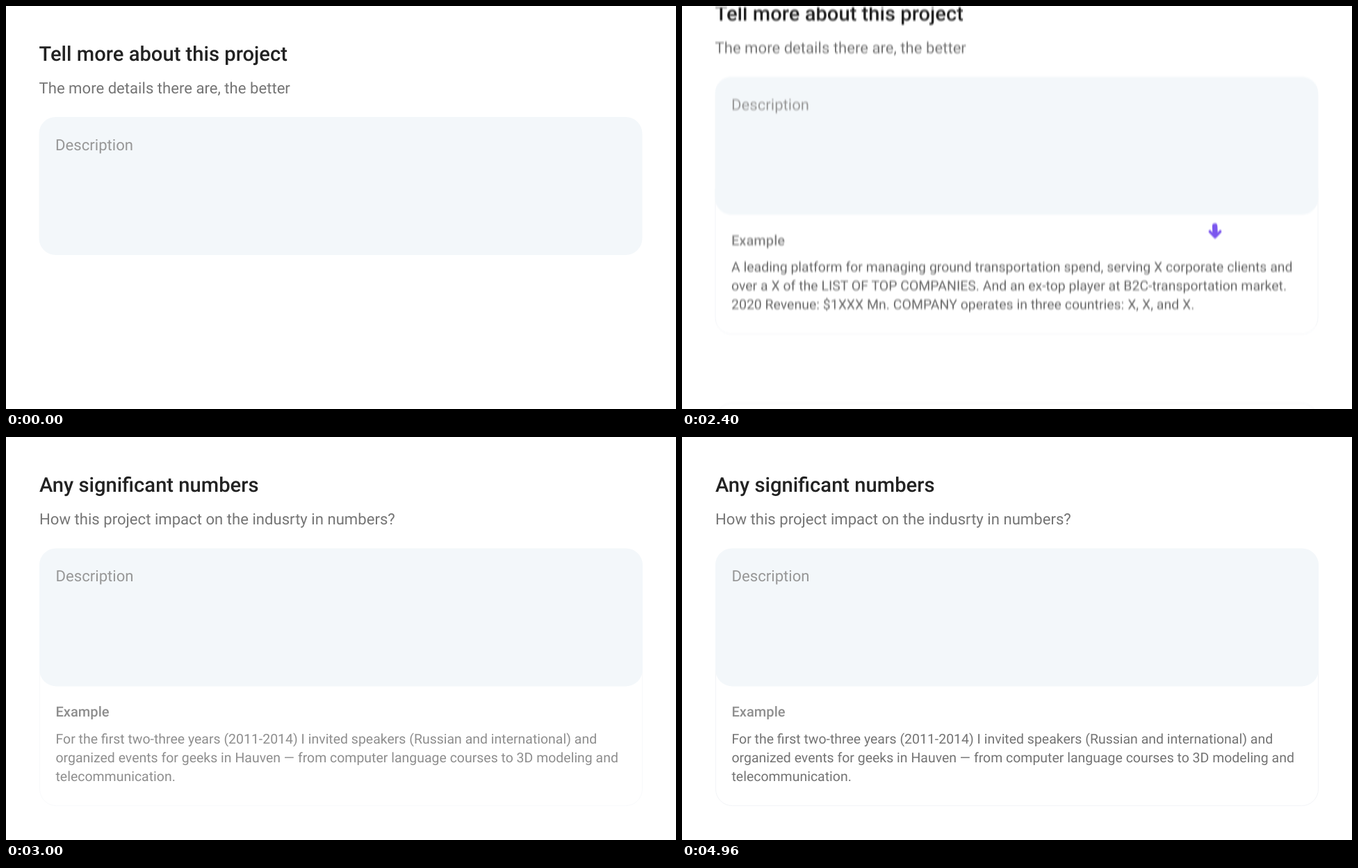
Recreate the animation shown at these times as an HTML page. Size 964 by 581 pixels, loop 5800 ms.

```html
<!DOCTYPE html>
<html lang="en">
<head>
<meta charset="utf-8">
<title>Project form</title>
<style>
  html, body { margin: 0; width: 100%; height: 100%; overflow: hidden; background: #fff; }
  svg { display: block; width: 964px; height: 581px; }
  text { font-family: Roboto, Arial, sans-serif; text-rendering: geometricPrecision; }
  .title { font-size: 29.17px; font-weight: 500; fill: #222; }
  .sub { font-size: 22.14px; fill: #757575; }
  .hint { font-size: 22.14px; fill: #979797; }
  .label { font-size: 20.1px; font-weight: 500; }
  .body { font-size: 19.48px; }
  .box { fill: #f3f7fa; }
  .card { fill: none; stroke: #f2f4f7; }
  .arrow { fill: none; stroke: #7b57ee; stroke-width: 7.5; stroke-linecap: round; stroke-linejoin: round; }
</style>
</head>
<body>
<svg id="stage" viewBox="0 0 964 581" xmlns="http://www.w3.org/2000/svg">
  <defs>
    <filter id="blur" filterUnits="userSpaceOnUse" x="0" y="-300" width="964" height="1181"
      color-interpolation-filters="sRGB"></filter>
  </defs>
  <g id="world"><g id="home"><g id="scenes"></g></g></g>
</svg>
<script>
const LOOP = 5800, STEP = 40, H = 581;
const SLIDE = { start: 2230, time: 651, path: 3 * H, shutter: 5.2 };
const CUT = SLIDE.start + SLIDE.time / 2;

// dark and grey hold the levels of [label, body]
const scenes = [
  {
    title: 'Tell more about this project',
    sub: 'The more details there are, the better',
    lines: [
      'A leading platform for managing ground transportation spend, serving X corporate clients and',
      'over a X of the LIST OF TOP COMPANIES. And an ex-top player at B2C-transportation market.',
      '2020 Revenue: $1XXX Mn. COMPANY operates in three countries: X, X, and X.'
    ],
    shift: [0, 0], arrowX: 0, arrowAt: 650,
    show: [190, 600], dim: [660, 1480], dark: [51, 58], grey: [133, 102]
  },
  {
    title: 'Any significant numbers',
    sub: 'How this project impact on the indusrty in numbers?',
    lines: [
      'For the first two-three years (2011-2014) I invited speakers (Russian and international) and',
      'organized events for geeks in Hauven — from computer language courses to 3D modeling and',
      'telecommunication.'
    ],
    shift: [0.5, 0.4], arrowX: 89.5, arrowAt: 3050,
    show: [2880, 3280], dim: [4330, 4920], dark: [34, 34], grey: [143, 115]
  }
];

const $ = id => document.getElementById(id);
const clamp = x => Math.max(0, Math.min(1, x));
const span = (t, a, b) => clamp((t - a) / (b - a));
const mix = (a, b, k) => a + (b - a) * k;
const inOut = u => u < 0.5 ? 4 * u ** 3 : 1 - 4 * (1 - u) ** 3;
const out = u => 1 - (1 - u) ** 2;

function add(parent, tag, attrs = {}, text = '') {
  const el = document.createElementNS('http://www.w3.org/2000/svg', tag);
  for (const k in attrs) el.setAttribute(k, attrs[k]);
  el.textContent = text;
  return parent.appendChild(el);
}
const set = (el, attrs) => { for (const k in attrs) el.setAttribute(k, attrs[k]); };
const show = (el, on) => { el.style.display = on ? '' : 'none'; };

function build(s) {
  const g = s.el = add($('scenes'), 'g');
  const page = add(g, 'g', { transform: `translate(${s.shift})` });
  const write = (parent, cls, x, y, text) => add(parent, 'text', { class: cls, x, y }, text);

  s.example = add(page, 'g');
  add(s.example, 'rect', { class: 'card', x: 48, y: 300, width: 867, height: 231.2, rx: 24 });
  s.label = write(s.example, 'label', 71, 403, 'Example');
  s.body = add(s.example, 'g');
  s.lines.forEach((line, i) => write(s.body, 'body', 71, 441.4 + 26.9 * i, line));

  add(page, 'rect', { class: 'box', x: 47.5, y: 160, width: 868, height: 199, rx: 24 });
  write(page, 'title', 47.5, 78.8, s.title);
  write(page, 'sub', 47.5, 126, s.sub);
  write(page, 'hint', 71, 208, 'Description');

  s.arrow = add(g, 'g', { class: 'arrow', transform: `translate(${s.arrowX})` });
  s.shaft = add(s.arrow, 'path', { d: 'M499 117C634 117 767 251 767 388' });
  s.head = add(s.arrow, 'path', { d: 'M-14.7-20L0-4.4L14.7-20' });
  s.length = s.shaft.getTotalLength();
}
scenes.forEach(build);

// Box blur: each pass averages the picture with a copy moved by half the last distance
const passes = Array.from({ length: 7 }, (_, i) => {
  const src = i ? 'mix' + (i - 1) : 'SourceGraphic';
  const move = add($('blur'), 'feOffset', { in: src, dx: 0, dy: 0, result: 'move' + i });
  add($('blur'), 'feComposite', {
    in: src, in2: 'move' + i, operator: 'arithmetic', k1: 0, k2: 0.5, k3: 0.5, k4: 0, result: 'mix' + i
  });
  return move;
});

// Mirrored copies above and below the page
const tiles = [-3, -2, -1, 1].map(k => ({ k, el: add($('world'), 'use', { href: '#scenes' }) }));

function slideAt(t) {
  const x = span(t, SLIDE.start, SLIDE.start + SLIDE.time);
  const s = 0.5 + 0.5 * Math.cbrt(2 * x - 1);
  return SLIDE.path * s * s * (3 - 2 * s);
}

function drawSlide(t) {
  const moving = t > SLIDE.start && t < SLIDE.start + SLIDE.time;
  tiles.forEach(tile => show(tile.el, moving));
  if (!moving) {
    $('world').removeAttribute('filter');
    $('home').removeAttribute('transform');
    return;
  }
  const from = slideAt(t - SLIDE.shutter / 2), to = slideAt(t + SLIDE.shutter / 2);
  const smear = Math.min(400, to - from);
  const y = (t < CUT ? 0 : SLIDE.path) - (from + to) / 2 - smear / 2;
  const base = ((y % (2 * H)) + 2 * H) % (2 * H);
  set($('home'), { transform: `translate(0 ${base})` });
  for (const { k, el } of tiles) {
    const top = base + k * H;
    set(el, { transform: k % 2 ? `translate(0 ${top + H}) scale(1 -1)` : `translate(0 ${top})` });
  }
  passes.forEach((p, i) => set(p, { dy: smear / 2 ** (i + 1) }));
  set($('world'), { filter: 'url(#blur)' });
}

function drawArrow(s, t) {
  const on = t >= 0 && t < 1910;
  show(s.arrow, on);
  if (!on) return;
  const tip = s.length * inOut(span(t, 0, 600));
  const tail = s.length * inOut(span(t, 1285, 1865));
  show(s.shaft, tip > tail);
  set(s.shaft, { 'stroke-dasharray': `${tip - tail} 2000`, 'stroke-dashoffset': -tail });

  const p = s.shaft.getPointAtLength(tip);
  const a = s.shaft.getPointAtLength(Math.max(0, tip - 1));
  const b = s.shaft.getPointAtLength(Math.max(1, tip));
  const turn = Math.atan2(b.y - a.y, b.x - a.x) * 180 / Math.PI - 90;
  const size = mix(0.28, 1, out(span(t, 550, 830)) - inOut(span(t, 1600, 1865)));
  set(s.head, { transform: `translate(${p.x} ${p.y}) rotate(${turn}) translate(0 5.4) scale(${size})` });
}

function drawScene(s, t) {
  const seen = span(t, ...s.show), dim = inOut(span(t, ...s.dim));
  const grey = i => { const v = Math.round(mix(s.dark[i], s.grey[i], dim)); return `rgb(${v},${v},${v})`; };
  show(s.example, seen > 0);
  set(s.example, { opacity: out(seen) });
  set(s.label, { fill: grey(0) });
  set(s.body, { fill: grey(1) });
  drawArrow(s, t - s.arrowAt);
}

function draw(now) {
  const t = Math.floor((now % LOOP) / STEP) * STEP;
  const live = t < CUT ? 0 : 1;
  scenes.forEach((s, i) => show(s.el, i === live));
  drawScene(scenes[live], t);
  drawSlide(t);
}

const begin = performance.now();
function tick() {
  draw(performance.now() - begin);
  requestAnimationFrame(tick);
}
tick();
</script>
</body>
</html>
```
